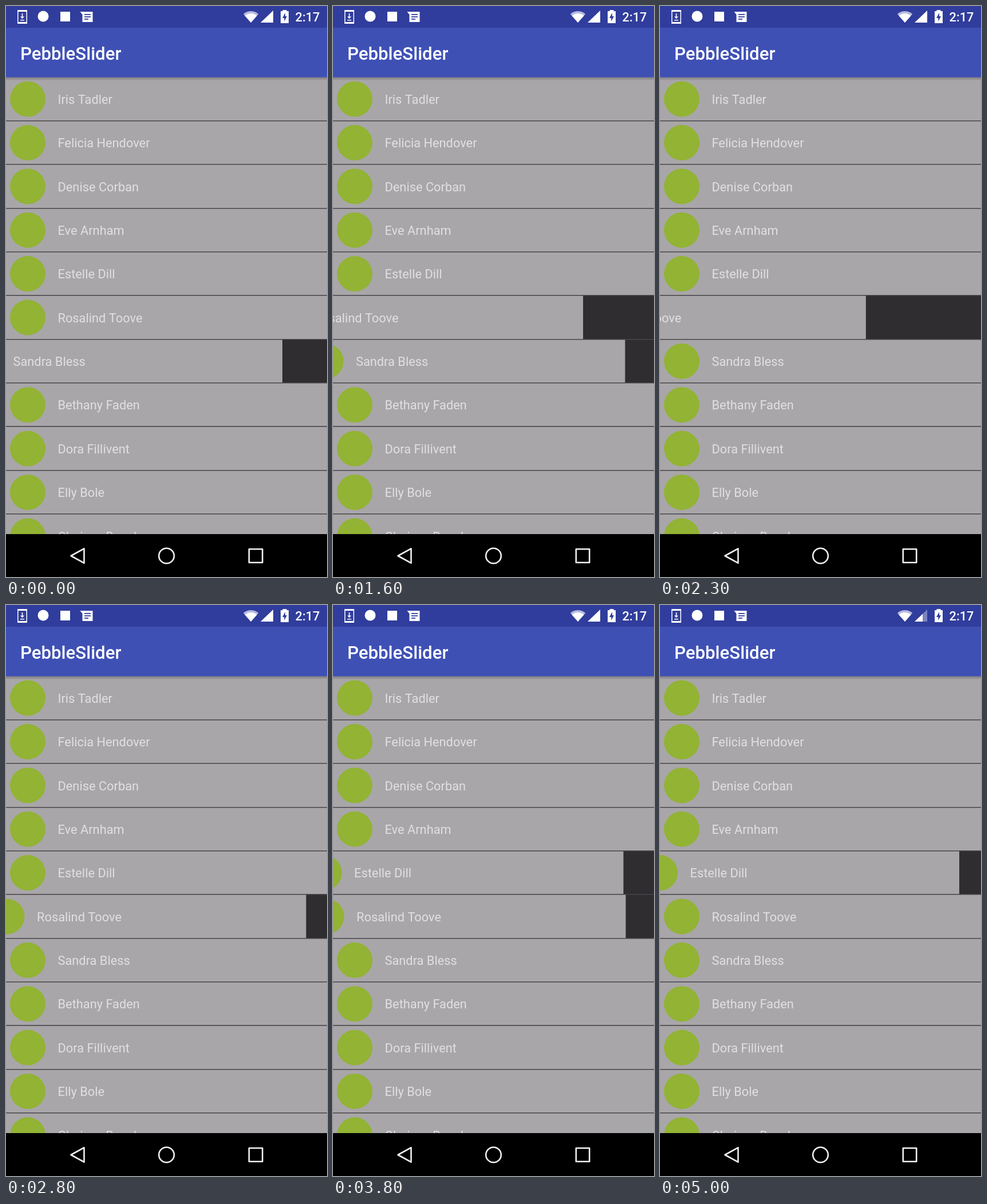
An HTML page with a canvas that plays this animation: 561x998 px, repeating every 5.1 s.

```html
<!DOCTYPE html>
<html lang="en">
<head>
<meta charset="utf-8">
<title>PebbleSlider</title>
<style>
html, body { margin: 0; width: 100%; height: 100%; overflow: hidden; background: #000; }
canvas { display: block; }
</style>
</head>
<body>
<canvas id="stage" width="561" height="998"></canvas>
<script>
const W = 561, H = 998, LOOP = 5100, TICK = 100;
const LIST_TOP = 124.2, PITCH = 76.38, BAR_END = 124.5, NAV_TOP = 923, OPEN = 78;
const WHITE = '#fff', STATUS = '#303d9c';
const ctx = document.getElementById('stage').getContext('2d');

const names = [
  'Iris Tadler', 'Felicia Hendover', 'Denise Corban', 'Eve Arnham',
  'Estelle Dill', 'Rosalind Toove', 'Sandra Bless', 'Bethany Faden',
  'Dora Fillivent', 'Elly Bole', 'Clarissa Bench'
];

const linear = p => p;
const smooth = p => p * p * (3 - 2 * p);
const fling = p => smooth(1 - Math.pow(1 - p, 2.75));

// Distance covered at time t by a move of dist pixels between start and end.
function move(t, start, end, dist, ease = smooth) {
  const p = Math.min(1, Math.max(0, (t - start) / (end - start)));
  return dist * ease(p);
}

// Each swiped row adds up its drags and snaps.
const swipes = {
  4: t => move(t, 3585, 4300, -OPEN, fling) + move(t, 4500, 5000, 40, linear),
  5: t => move(t, 1384, 1900, -327) + move(t, 1918, 2850, 307, linear)
        + move(t, 2850, 3100, 20 - OPEN) + move(t, 3677, 3977, OPEN),
  6: t => move(t, 1480, 1780, OPEN) - OPEN
};

function box(x, y, w, h, color) {
  ctx.fillStyle = color;
  ctx.fillRect(x, y, w, h);
}

function wedge(x, y, r, from, to, color) {
  ctx.fillStyle = color;
  ctx.beginPath();
  ctx.moveTo(x, y);
  ctx.arc(x, y, r, from, to);
  ctx.fill();
}

function disc(x, y, r, color) {
  wedge(x, y, r, 0, Math.PI * 2, color);
}

function trace(points) {
  ctx.beginPath();
  points.forEach(([x, y]) => ctx.lineTo(x, y));
  ctx.closePath();
}

function poly(points, color) {
  ctx.fillStyle = color;
  trace(points);
  ctx.fill();
}

function label(str, x, y, size, weight, color) {
  ctx.font = `${weight} ${size}px Roboto, sans-serif`;
  ctx.fillStyle = color;
  ctx.fillText(str, x, y);
}

function drawRow(i, t) {
  const y = LIST_TOP + i * PITCH;
  const x = swipes[i] ? swipes[i](t) : 0;
  box(0, y, W, PITCH + 1, '#2f2d30');
  box(x, y, W, PITCH + 1, '#a9a6a9');
  disc(x + 38, y + 38.3, 31, '#92b334');
  label(names[i], x + 90.5, y + 46.6, 21.8, 400, '#e1dfe1');
}

function drawList(t) {
  names.forEach((_, i) => drawRow(i, t));
  for (let i = 1; i < names.length; i++) {
    box(0, Math.round(LIST_TOP + i * PITCH - 0.8), W, 1.5, '#48464a');
  }
  const shade = ctx.createLinearGradient(0, BAR_END, 0, BAR_END + 6);
  shade.addColorStop(0, 'rgba(0,0,0,.26)');
  shade.addColorStop(1, 'rgba(0,0,0,0)');
  box(0, BAR_END, W, 6, shade);
}

function drawDownload() {
  box(20, 7, 17, 24, WHITE);
  box(21.5, 10, 14, 18, STATUS);
  box(27.7, 13, 1.6, 7, WHITE);
  poly([[25, 18.5], [32, 18.5], [28.5, 22.5]], WHITE);
  box(25, 24, 7, 1.5, WHITE);
}

function drawMessage() {
  poly([[129.5, 10], [151.5, 10], [151.5, 28], [133.5, 28], [133.5, 15]], WHITE);
  for (let i = 0; i < 3; i++) box(137, 14 + i * 4, i < 2 ? 11 : 7, 1.8, STATUS);
}

function drawWifi() {
  const up = -Math.PI / 2, spread = 0.72;
  wedge(428, 29, 20, up - spread, up + spread, '#b5bae0');
  wedge(428, 29, 16, up - spread, up + spread, WHITE);
}

// Triangle filled from the left up to the given share.
function drawSignal(level) {
  const part = (k, color) =>
    poly([[445, 29], [445 + 22 * k, 29], [445 + 22 * k, 29 - 21 * k]], color);
  part(1, '#7a83c2');
  part(level, WHITE);
}

function drawBattery() {
  box(483.5, 7, 7, 3, WHITE);
  box(480, 9, 14, 21, WHITE);
  poly([[488, 12], [483, 21], [486.3, 21], [486.3, 27], [491, 18], [488, 18]], STATUS);
}

function drawStatus(t) {
  box(0, 0, W, 38, STATUS);
  drawDownload();
  disc(65, 18, 9.5, WHITE);
  box(95, 10, 17, 17, WHITE);
  drawMessage();
  drawWifi();
  drawSignal(t < 4600 ? 1 : 0.64);
  drawBattery();
  label('2:17', 505.5, 27, 21.8, 500, WHITE);
}

function drawNav() {
  box(0, NAV_TOP, W, H - NAV_TOP, '#000');
  ctx.strokeStyle = '#f2f2f2';
  ctx.lineWidth = 2.6;
  ctx.lineJoin = 'round';
  trace([[113.5, 961], [136.5, 948.3], [136.5, 973.7]]);
  ctx.stroke();
  ctx.beginPath();
  ctx.arc(280.5, 961, 13.3, 0, Math.PI * 2);
  ctx.stroke();
  ctx.strokeRect(424.8, 949.3, 23.4, 23.4);
}

function draw(t) {
  drawList(t);
  box(0, 38, W, BAR_END - 38, '#3f50b5');
  label('PebbleSlider', 25, 93.5, 31.2, 500, WHITE);
  drawStatus(t);
  drawNav();
}

function frame() {
  const t = performance.now() % LOOP;
  draw(Math.floor(t / TICK) * TICK);
  requestAnimationFrame(frame);
}
frame();
</script>
</body>
</html>
```
